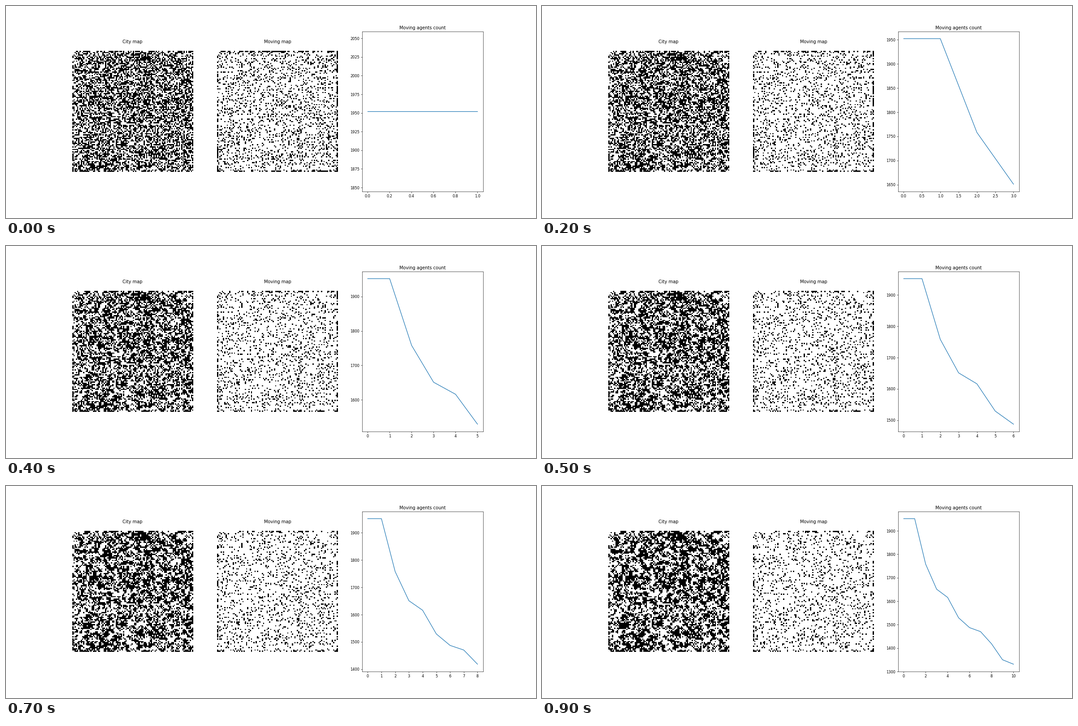
Write a matplotlib script that moves like this. It is 1183 px wide and 473 px high and loops after 1000 ms.

```python
import numpy as np
import matplotlib.pyplot as plt
from matplotlib.animation import FuncAnimation

SIZE = 100
RELOCATE_SHARE = 0.14
COUNTS = [1952, 1952, 1758, 1651, 1616, 1529, 1487, 1470, 1418, 1350, 1331]
STEPS = len(COUNTS) - 1


def same_neighbours(city):
    """Number of the eight neighbours that share each cell's type."""
    padded = np.pad(city, 1, constant_values=-1)
    total = np.zeros(city.shape)
    for dy in range(3):
        for dx in range(3):
            if (dy, dx) != (1, 1):
                total += padded[dy:dy + SIZE, dx:dx + SIZE] == city
    return total


def simulate():
    """Segregation model: some of the unhappy agents trade places every step."""
    rng = np.random.default_rng(7)
    city = (rng.random((SIZE, SIZE)) < 0.51).astype(int)
    tie_break = rng.random((SIZE, SIZE)) * 0.9
    history = []
    for count in COUNTS[1:]:
        score = same_neighbours(city) + tie_break
        unhappy = np.argsort(score, axis=None)[:count]
        moving = np.zeros(city.size, dtype=int)
        moving[unhappy] = 1
        history.append((city.copy(), moving.reshape(city.shape)))
        movers = rng.choice(unhappy, int(count * RELOCATE_SHARE), replace=False)
        city.flat[movers] = rng.permutation(city.flat[movers])
    return history


def add_map(ax, title):
    ax.set_title(title + "\n", pad=7.2)
    ax.axis("off")
    return ax.imshow(np.zeros((SIZE, SIZE)), cmap="binary", vmin=0, vmax=1,
                     interpolation="nearest")


plt.rcParams["font.family"] = "DejaVu Sans"
fig, (city_ax, moving_ax, count_ax) = plt.subplots(
    1, 3, figsize=(20, 8), dpi=59.15)
fig.subplots_adjust(left=0.125, right=0.9, bottom=0.125, top=0.88, wspace=0.2)

city_image = add_map(city_ax, "City map")
moving_image = add_map(moving_ax, "Moving map")
count_ax.set_title("Moving agents count")
count_line, = count_ax.plot([], [], color="#1f77b4")

history = simulate()


def draw(step):
    city, moving = history[step]
    city_image.set_data(city)
    moving_image.set_data(moving)
    count_line.set_data(range(step + 2), COUNTS[:step + 2])
    count_ax.relim()
    count_ax.autoscale_view()
    return city_image, moving_image, count_line


anim = FuncAnimation(fig, draw, frames=STEPS, interval=100, repeat=True,
                     repeat_delay=0, blit=False)
plt.show()
```
